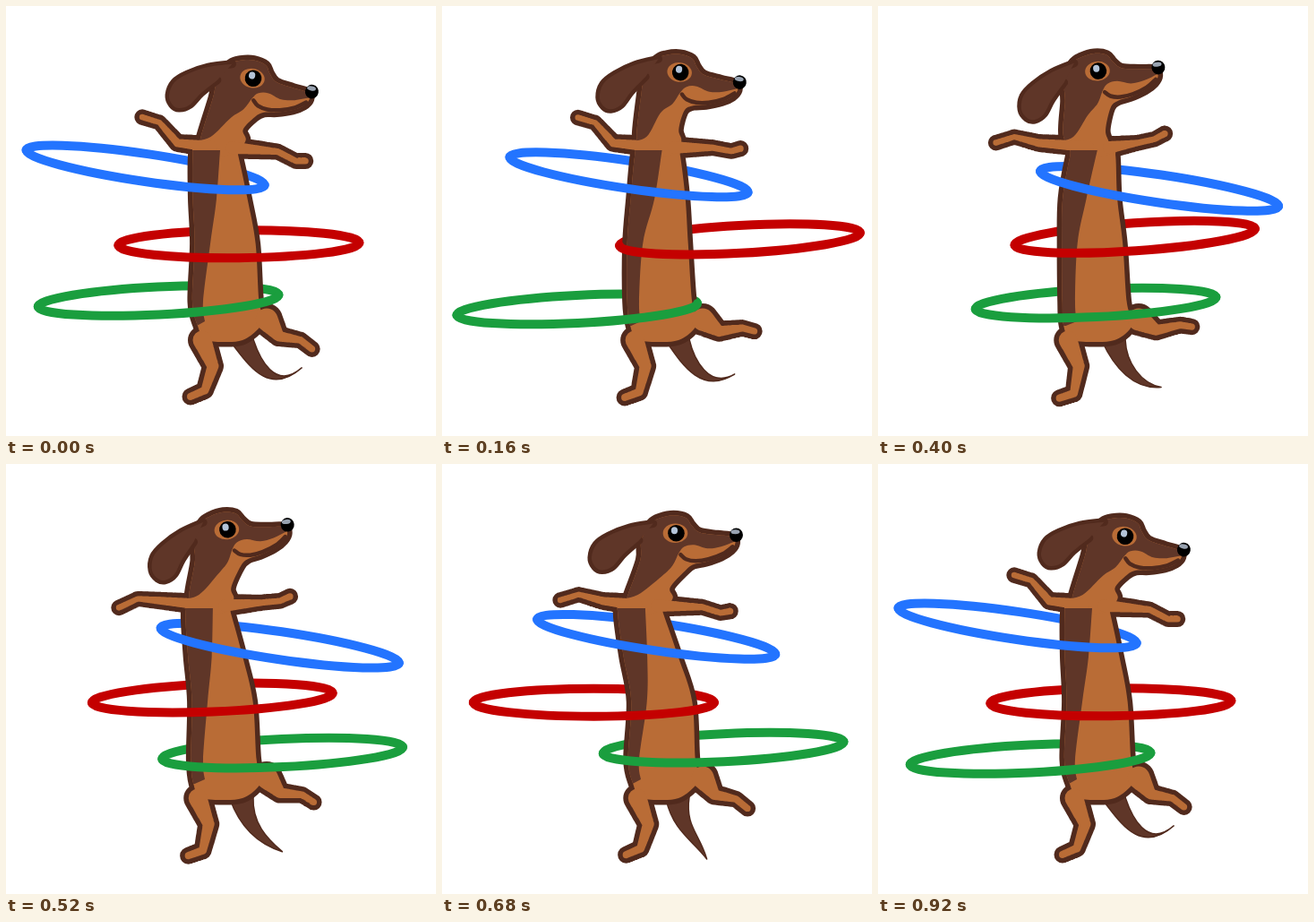
Recreate the animation shown at these times as an HTML page with a canvas. Size 480 by 480 pixels, loop 960 ms.

```html
<!DOCTYPE html>
<html>
<head>
<meta charset="utf-8">
<style>
  html, body { margin: 0; width: 100%; height: 100%; overflow: hidden; background: #fff; }
  canvas { display: block; }
</style>
</head>
<body>
<canvas id="stage" width="480" height="480"></canvas>
<script>
const ctx = document.getElementById('stage').getContext('2d');
const LINE = '#512a1d', DARK = '#5f3628', TAN = '#b96c36';
const LOOP = 960, STEP = 40, CYCLE = 920, EDGE = 5.5, INSET = 4.5;
const RAD = Math.PI / 180;
let phase = 0;

// Mean plus cosine and sine weights of successive harmonics of the cycle.
const wave = (mean, ...weights) => weights.reduce((sum, w, i) =>
  sum + w * (i % 2 ? Math.sin : Math.cos)(phase * (1 + (i >> 1))), mean);

// Catmull-Rom curve through points.
function spline(pts, closed) {
  const path = new Path2D(), n = pts.length;
  const at = i => closed ? pts[(i + n) % n] : pts[Math.max(0, Math.min(n - 1, i))];
  path.moveTo(...pts[0]);
  for (let i = 0; i < (closed ? n : n - 1); i++) {
    const [a, b, c, d] = [at(i - 1), at(i), at(i + 1), at(i + 2)];
    path.bezierCurveTo(b[0] + (c[0] - a[0]) / 6, b[1] + (c[1] - a[1]) / 6,
      c[0] - (d[0] - b[0]) / 6, c[1] - (d[1] - b[1]) / 6, ...c);
  }
  if (closed) path.closePath();
  return path;
}

// Tapered limb through [x, y, radius] joints.
function limb(joints, grow) {
  const path = new Path2D();
  for (let i = 1; i < joints.length; i++) {
    for (let k = 0; k <= 30; k++) {
      const [x, y, r] = joints[i - 1].map((p, j) => p + (joints[i][j] - p) * k / 30);
      path.moveTo(x + r + grow, y);
      path.arc(x, y, r + grow, 0, 7);
    }
  }
  return path;
}

function fill(path, color) {
  ctx.fillStyle = color;
  ctx.fill(path);
}

function stroke(path, color, width) {
  ctx.strokeStyle = color;
  ctx.lineWidth = width;
  ctx.stroke(path);
}

function oval(x, y, rx, ry, color) {
  const path = new Path2D();
  path.ellipse(x, y, rx, ry, 0, 0, 7);
  fill(path, color);
}

// Fills the part of a shape that lies on one side of a curve closed by corners.
function shade(shape, curve, corners) {
  const path = spline(curve);
  for (const p of corners) path.lineTo(...p);
  ctx.save();
  ctx.clip(shape);
  fill(path, DARK);
  ctx.restore();
}

function drawHoops(front) {
  const blueX = wave(238.5, -80, 7.4, -2.9, -1.7);
  const hoops = [
    ['#2374ff', blueX, 157.4 + .148 * blueX, 8.4],
    ['#c40000', wave(252.2, -3, 86, 7, 17, 3.7, 6.8), wave(262.4, 3.3, -4), wave(-1.9, 1.3, -2)],
    ['#1a9e3e', wave(231, -54, -72, -6.9, 5.6), wave(328, 1, 11.3), -2.8]
  ];
  const start = front ? 0 : Math.PI;
  for (const [color, x, y, tilt] of hoops) {
    const path = new Path2D();
    path.ellipse(x, y, 134.5, 15.5, tilt * RAD, start, start + Math.PI);
    stroke(path, color, 10);
  }
}

// The tail drops slowly, then whips back up.
function drawTail(t) {
  const drop = t < 820 ? (t / 820) ** 1.3 : (CYCLE - t) / 100;
  const angle = (23 + 51 * drop) * RAD;
  const x = 262 + 74 * Math.cos(angle), y = 375 + 74 * Math.sin(angle);
  const ax = 275 - 15 * drop, ay = 396 + 14 * drop, bx = 296 - 16 * drop, by = 434 - 22 * drop;
  const path = new Path2D();
  path.moveTo(250, 374);
  path.bezierCurveTo(ax - 5, ay + 3, bx - 4, by + 3, x, y);
  path.bezierCurveTo(bx + 4, by - 4, ax + 8, ay - 3, 276, 372);
  fill(path, DARK);
  stroke(path, LINE, 1.5);
}

function limbJoints(left, right, hip) {
  const raise = Math.cos(phase - 30 * RAD);
  const reach = Math.cos(phase - 25 * RAD), sink = Math.cos(phase + 25 * RAD);
  const kick = ((1 + Math.cos(phase - 115 * RAD)) / 2) ** 2.5;
  return [
    [[left + 25, 157, 6.5], [184.5 + 8 * raise, 153, 4.5], [160 + 13 * raise, 139.5 - 11 * raise, 3],
      [140 + 14 * raise, 141 - 19.5 * raise, 3.3]],
    [[right - 12, 158, 7], [295 + 9 * reach, 158 + 5 * sink, 3.5], [315.5 + 9.5 * reach, 161.5 + 13 * sink, 3.3],
      [326 + 9 * reach, 158.5 + 16 * sink, 3.6]],
    [[219 + hip, 373, 10.5], [231 + hip, 402, 6.5], [222 + hip / 2, 429 - hip / 2, 4.5], [206 + hip / 2, 436 - hip / 4, 4]],
    [[291, 350, 12.5], [304 + 9 * kick, 369 - 10 * kick, 6], [328 + 13 * kick, 374 - 25 * kick, 3.8],
      [341 + 13 * kick, 384.5 - 37 * kick, 3.6]]
  ];
}

function drawDog(t) {
  // Sides of the body at chest, waist and belly
  const l1 = wave(203.4, .6, 11, 0, -3.5), l2 = wave(202, 2, 3.7), l3 = wave(203.9, 2.2, -3);
  const r1 = l1 + 60, r2 = l2 + 70, r3 = l3 + 77, r4 = wave(285, 2, -2.5);
  const hip = wave(-3, 3, -2.5);
  const neck = wave(206.4, 6.2, 3.4);
  const ex = wave(260.7, 15.3, -1.8), ey = wave(76, 2.5, -.9, 0, 0, 2.3);
  const turn = wave(2.3, 8.8, 1.6) * RAD, earTurn = wave(-1.2, 0, -4.8, -2, -3) * RAD;
  const onHead = ([x, y]) => [ex + x * Math.cos(turn) - y * Math.sin(turn), ey + x * Math.sin(turn) + y * Math.cos(turn)];

  const head = spline([
    ...[[-28, -11], [-18, -17], [-3, -20], [11, -17], [17, -9], [26, -1], [46, 2], [63, 4], [66, 11],
      [61, 19], [50, 26], [33, 32], [19, 35], [10, 42]].map(onHead),
    [neck + 52, 138], [neck + 55, 150], [r1 - 8, 164], [(l1 + r1) / 2, 168], [l1 + 12, 160], [neck + 5, 146],
    ...[[-40, 30], [-39, 8]].map(onHead)
  ], true);
  const torso = spline([
    [l1 + 9, 158], [l1 + INSET, 168], [l2 + INSET, 215], [l3 + INSET, 265], [208 + hip / 3, 330], [214 + hip, 357],
    [222 + hip, 372], [242 + hip / 2, 375], [264, 373], [281, 361], [r4 + 1, 348], [r4 - INSET, 330],
    [r3 - INSET, 265], [r2 - INSET, 215], [r1 - INSET, 168], [r1 - 8, 157]
  ], true);
  const limbs = limbJoints(l1, r1, hip);

  drawTail(t);
  for (const joints of limbs) fill(limb(joints, EDGE), LINE);
  for (const shape of [torso, head]) stroke(shape, LINE, 2 * EDGE);
  for (const shape of [torso, head]) fill(shape, TAN);
  for (const joints of limbs) fill(limb(joints, 0), TAN);

  shade(torso, [[l1 + 35, 161], [l2 + 31, 215], [l3 + 22, 265], [220, 330], [222, 352]],
    [[213 + hip / 2, 357], [180, 357], [180, 161]]);
  shade(head, [...[[80, 4], [66, 9], [50, 15], [35, 17], [20, 13], [9, 15], [3, 22], [-4, 36], [-16, 48]].map(onHead),
    [neck + 16, 146], [neck - 4, 151]], [[-60, 60], [-60, -40], [60, -40]].map(onHead));
  stroke(spline([[5, 24], [11, 29], [22, 31], [36, 29], [52, 23], [63, 15]].map(onHead)), LINE, 4.5);

  ctx.save();
  ctx.translate(ex, ey);
  ctx.rotate(turn);
  oval(-1, 0, 13.8, 10.8, TAN);
  oval(0, 0, 9.3, 9.3, '#000');
  oval(-2, -3, 3.6, 4, '#b4c4d8');
  oval(67, 2, 7.5, 7.8, '#000');
  oval(66, -1.5, 5, 2.5, '#98a2b0');

  // Ear swings about its root
  ctx.translate(-30, -8);
  ctx.rotate(earTurn);
  const ear = spline([[4, -3], [-22, 4], [-44, 15], [-57, 26], [-61, 41], [-56, 51], [-48, 54], [-37, 49], [-26, 34], [-10, 17]]);
  stroke(ear, LINE, 2 * INSET);
  fill(ear, DARK);
  ctx.restore();
}

function draw(now) {
  const t = Math.floor(now % LOOP / STEP) * STEP;
  phase = 2 * Math.PI * t / CYCLE;
  ctx.fillStyle = '#fff';
  ctx.fillRect(0, 0, 480, 480);
  ctx.lineJoin = ctx.lineCap = 'round';
  drawHoops(false);
  drawDog(t);
  drawHoops(true);
  requestAnimationFrame(draw);
}
requestAnimationFrame(draw);
</script>
</body>
</html>
```
